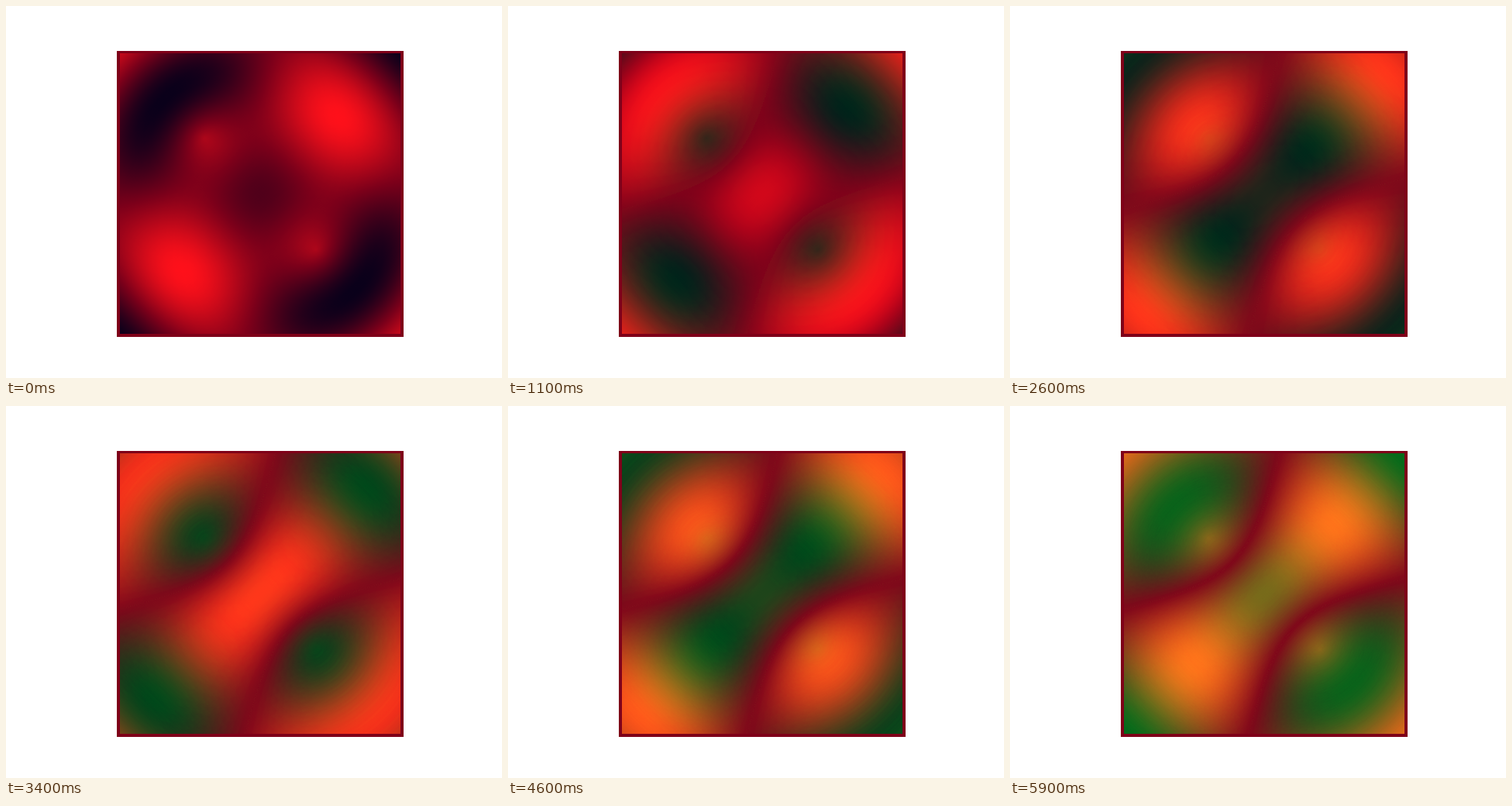
Animation of 640x480 px, one loop 6 s. Source, as an HTML page without scripts:

```html
<!DOCTYPE html>
<html lang="en">
<head>
<meta charset="utf-8">
<title>Two-source interference</title>
<style>
  @property --tick { syntax: "<number>"; inherits: true; initial-value: 0; }

  html, body { margin: 0; width: 100%; height: 100%; overflow: hidden; background: #fff; }

  .frame { position: absolute; left: 143px; top: 58px; width: 370px; height: 369px; background: #7f0019; }

  .field {
    position: absolute; left: 4px; top: 3px; width: 362px; height: 362px;
    overflow: hidden; isolation: isolate;
    --length: 232.2px;
    animation: run 6s steps(60) infinite;
  }
  @keyframes run { from { --tick: 0; } to { --tick: 60; } }

  /* Mean of two circular waves, as grey; one period is 20 ticks. */
  .wave, .wave::before, .wave::after { position: absolute; inset: 0; }
  .wave::before, .wave::after {
    content: "";
    --start: calc(var(--length) * var(--phase) / 20);
    background: repeating-radial-gradient(circle at var(--source),
      #808080 var(--start), #5f5f5f, #404040, #252525, #111, #040404,
      #000, #040404, #111, #252525, #404040, #5f5f5f,
      #808080, #a1a1a1, #bfbfbf, #dadada, #eee, #fbfbfb,
      #fff, #fbfbfb, #eee, #dadada, #bfbfbf, #a1a1a1,
      #808080 calc(var(--start) + var(--length)));
  }
  .wave::before { --source: 108.9px 109.3px; }
  .wave::after { --source: 253.1px 253.5px; opacity: .5; }

  .live { --phase: var(--tick); filter: url(#red); }

  /* Each crest leaves green behind, once per period. */
  .trace {
    --extra: 0;
    --age: calc(var(--tick) - var(--phase));
    filter: url(#crest);
    mix-blend-mode: plus-lighter;
    opacity: calc(.0204 * (var(--extra) + clamp(0, var(--age) + 1, 1)
      + clamp(0, var(--age) - 19, 1) + clamp(0, var(--age) - 39, 1)));
  }
  .first { --extra: 2; }
</style>
</head>
<body>
<svg width="0" height="0" style="position:absolute">
  <filter id="red" color-interpolation-filters="sRGB" x="0" y="0" width="1" height="1">
    <feColorMatrix values="1 0 0 0 0  0 0 0 0 0  0 0 0 0 .1  0 0 0 1 0"/>
  </filter>
  <filter id="crest" color-interpolation-filters="sRGB" x="0" y="0" width="1" height="1">
    <feColorMatrix values="0 0 0 0 0  2 0 0 0 -1  0 0 0 0 0  0 0 0 1 0"/>
  </filter>
</svg>
<div class="frame">
  <div class="field">
    <div class="wave live"></div>
    <div class="wave trace first" style="--phase:0"></div>
    <div class="wave trace" style="--phase:1"></div>
    <div class="wave trace" style="--phase:2"></div>
    <div class="wave trace" style="--phase:3"></div>
    <div class="wave trace" style="--phase:4"></div>
    <div class="wave trace" style="--phase:5"></div>
    <div class="wave trace" style="--phase:6"></div>
    <div class="wave trace" style="--phase:7"></div>
    <div class="wave trace" style="--phase:8"></div>
    <div class="wave trace" style="--phase:9"></div>
    <div class="wave trace" style="--phase:10"></div>
    <div class="wave trace" style="--phase:11"></div>
    <div class="wave trace" style="--phase:12"></div>
    <div class="wave trace" style="--phase:13"></div>
    <div class="wave trace" style="--phase:14"></div>
    <div class="wave trace" style="--phase:15"></div>
    <div class="wave trace" style="--phase:16"></div>
    <div class="wave trace" style="--phase:17"></div>
    <div class="wave trace" style="--phase:18"></div>
    <div class="wave trace" style="--phase:19"></div>
  </div>
</div>
</body>
</html>
```
